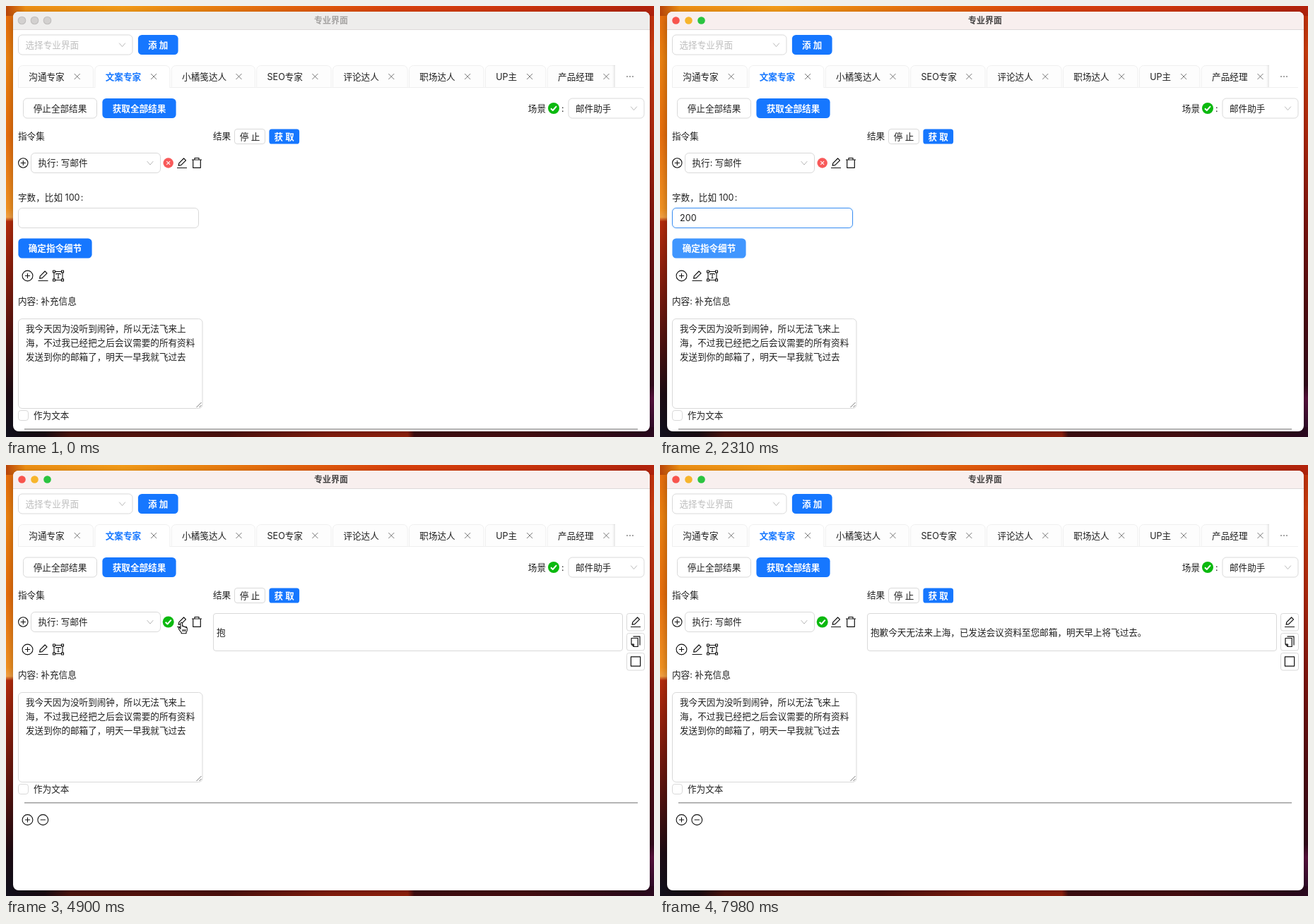
An HTML page with a canvas for the animation above (8000 ms loop, 917x611 px).

```html
<!DOCTYPE html>
<html lang="zh-CN">
<head>
<meta charset="utf-8">
<style>
  html, body { margin: 0; width: 100%; height: 100%; overflow: hidden; background: #fff; }
  canvas { display: block; width: 917px; height: 611px; }
</style>
</head>
<body>
<canvas id="stage"></canvas>
<script>
const W = 917, H = 611, LOOP = 8000, STEP = 70;
const BLUE = '#1677ff', INK = '#1f1f1f', BORDER = '#d9d9d9';
const FONT = 'Inter, "Noto Sans CJK SC", "Noto Sans CJK", sans-serif';
const canvas = document.getElementById('stage');
const ctx = canvas.getContext('2d');
const ratio = window.devicePixelRatio || 1;
canvas.width = W * ratio;
canvas.height = H * ratio;

const ICONS = {
  cross: 'M-4-4L4 4M4-4L-4 4',
  chevron: 'M-4.3-2.4L0 2.6L4.3-2.4',
  tick: 'M-4 .2L-1.2 3L4-2.8',
  plus: 'M-3.6 0H3.6M0-3.6V3.6',
  minus: 'M-3.6 0H3.6',
  pencil: 'M-7 7H7M-4.8 3.6L-4.2 .3L2.6-6.5L5.5-3.6L-1.3 3.1Z',
  trash: 'M-7-4.5H7M-3-4.5V-7H3V-4.5M-5.3-4.5V6.8H5.3V-4.5',
  frame: 'M-6-5.3V5.3M6-5.3V5.3M-5-6H5M-5 6H5M-3-1.4V-3H3V-1.4M0-3V3.2M-1.5 3.2H1.5' +
    'M-7.5-7.5h3v3h-3zM4.5-7.5h3v3h-3zM-7.5 4.5h3v3h-3zM4.5 4.5h3v3h-3z',
  copy: 'M-6-5H3.2V7H-2.6L-6 3.6ZM-6 3.6H-2.6V7M-3.5-7.4H6V5',
  square: 'M-6.6-6.6H6.6V6.6H-6.6Z',
  grip: 'M-7 0L0-7M-3 0L0-3',
  hand: 'M4 10V2.2Q4 .7 5.3 .7T6.6 2.2V6.1Q8.4 5.4 9 6.9Q10.8 6.3 11.3 7.8' +
    'Q13.3 7.5 13.3 9.4V11.6Q13.3 13.4 12 14.5V16.3H5.2V15Q3.6 13.2 1.6 10.2' +
    'Q.6 8.4 1.8 8Q2.8 7.8 4 10ZM6.9 10.4V13.6M8.8 10.4V13.6M10.7 10.4V13.6'
};
for (const name in ICONS) ICONS[name] = new Path2D(ICONS[name]);

const clamp = v => Math.max(0, Math.min(1, v));
const ramp = (t, from, to) => clamp((t - from) / (to - from));

function mix(a, b, p) {
  const channel = (hex, i) => parseInt(hex.slice(i, i + 2), 16);
  return `rgb(${[1, 3, 5].map(i => Math.round(channel(a, i) + (channel(b, i) - channel(a, i)) * p))})`;
}

function text(str, x, y, { color = INK, weight = 400, size = 12.6, align = 'left' } = {}) {
  ctx.font = `${weight} ${size}px ${FONT}`;
  ctx.textAlign = align;
  ctx.fillStyle = color;
  ctx.fillText(str, x, y + size * 0.37);
}

function roundRect(x, y, w, h, radius, fill) {
  ctx.beginPath();
  ctx.roundRect(x, y, w, h, radius);
  ctx.fillStyle = fill;
  ctx.fill();
}

function box(x, y, w, h, { radius = 5.4, fill = '#fff', stroke = BORDER } = {}) {
  roundRect(x + 0.5, y + 0.5, w - 1, h - 1, radius, fill);
  ctx.strokeStyle = stroke;
  ctx.lineWidth = 1;
  ctx.stroke();
}

function line(x1, y1, x2, y2, color, width = 1) {
  ctx.beginPath();
  ctx.moveTo(x1, y1);
  ctx.lineTo(x2, y2);
  ctx.strokeStyle = color;
  ctx.lineWidth = width;
  ctx.stroke();
}

function icon(name, x, y, { color = '#111', width = 1.2, fill } = {}) {
  ctx.save();
  ctx.translate(x, y);
  ctx.lineJoin = 'round';
  if (fill) { ctx.fillStyle = fill; ctx.fill(ICONS[name]); }
  ctx.strokeStyle = color;
  ctx.lineWidth = width;
  ctx.stroke(ICONS[name]);
  ctx.restore();
}

function disc(x, y, r, fill, stroke) {
  ctx.beginPath();
  ctx.arc(x, y, r, 0, 7);
  if (fill) { ctx.fillStyle = fill; ctx.fill(); }
  if (stroke) { ctx.strokeStyle = stroke; ctx.lineWidth = 1.1; ctx.stroke(); }
}

function circled(name, x, y, r = 7.4) {
  disc(x, y, r, null, '#111');
  icon(name, x, y, { width: 1.1 });
}

function badge(x, y, ok) {
  disc(x, y, ok ? 8 : 7.2, ok ? '#0bb90f' : '#f85a5a');
  if (ok) return icon('tick', x, y, { color: '#fff', width: 2 });
  ctx.save();
  ctx.translate(x, y);
  ctx.scale(0.6, 0.6);
  icon('cross', 0, 0, { color: '#fff', width: 1.8 });
  ctx.restore();
}

function button(label, x, y, w, h, { fill = BLUE, radius = 5.4 } = {}) {
  const plain = fill === '#fff';
  if (plain) box(x, y, w, h, { radius });
  else roundRect(x + 0.4, y + 0.4, w - 0.8, h - 0.8, radius, fill);
  text(label, x + w / 2, y + h / 2, { align: 'center', color: plain ? INK : '#fff', weight: plain ? 400 : 600 });
}

function select(label, x, y, w, color = INK) {
  box(x, y, w, 29);
  text(label, x + 10.5, y + 14.5, { color });
  icon('chevron', x + w - 15, y + 14.5, { color: '#b8b8b8', width: 1 });
}

function strip(x, y, w, h, colors) {
  const g = w > h ? ctx.createLinearGradient(0, 0, W, 0) : ctx.createLinearGradient(0, 0, 0, H);
  colors.split(' ').forEach(stop => {
    const [color, at] = stop.split('@');
    g.addColorStop(at / 100, color);
  });
  ctx.fillStyle = g;
  ctx.fillRect(x, y, w, h);
}

function wallpaper() {
  strip(0, 0, 20, H, '#e86a0c@0 #f0840f@12 #ec700c@30 #f79522@47 #f9a545@49 #b82c0c@50 #8e1f0d@62 #50120f@78 #1e0c14@90 #10101c@100');
  strip(897, 0, 20, H, '#c8300c@0 #d8400c@10 #b8290c@30 #84150e@50 #540c12@70 #340b1c@88 #5c1240@91 #260a24@100');
  strip(0, 597, W, 14, '#12101c@0 #1c0c14@6 #56160f@10 #5e150e@20 #54120e@34 #92200e@50 #a0240e@62 #440e12@63 #4e0f12@80 #2c0920@100');
  strip(0, 0, W, 14, '#b84408@0 #f09114@3 #f79d18@18 #ee8510@30 #e6640c@44 #dc420b@60 #d0360b@78 #b3230c@100');
}

function windowFrame() {
  ctx.save();
  ctx.shadowColor = 'rgba(0,0,0,.35)';
  ctx.shadowBlur = 14 * ratio;
  ctx.shadowOffsetY = 4 * ratio;
  roundRect(10, 8, 901, 595, 8, '#fff');
  ctx.restore();
}

function titleBar(active) {
  ctx.fillStyle = active ? '#f8efee' : '#eeedec';
  ctx.fillRect(10, 8, 901, 26);
  line(10, 33.5, 911, 33.5, '#dedada');
  ['#f8544d', '#f7b52c', '#2bc440'].forEach((color, i) =>
    disc(22.5 + i * 18, 20.5, 5.3, active ? color : '#d2d0cf', active ? null : '#c0bebd'));
  text('专业界面', 460, 20.5, { size: 12, weight: 600, align: 'center', color: active ? '#464444' : '#a5a3a2' });
}

function tabs() {
  line(17, 115.5, 903, 115.5, '#f0f0f0');
  ctx.save();
  ctx.beginPath();
  ctx.rect(17, 80, 845, 37);
  ctx.clip();
  const labels = [['沟通专家', 107], ['文案专家', 107], ['小橘笺达人', 119], ['SEO专家', 106.5],
    ['评论达人', 106.5], ['职场达人', 106.5], ['UP主', 86.5], ['产品经理', 107]];
  let x = 17;
  labels.forEach(([label, w], i) => {
    const active = i === 1;
    box(x, 84, w, 32, { radius: [6, 6, 0, 0], fill: active ? '#fff' : '#fdfdfd', stroke: '#efefef' });
    if (active) line(x + 1, 115.5, x + w - 1, 115.5, '#fff', 1.2);
    text(label, x + 15.3, 100, active ? { color: BLUE, weight: 600 } : {});
    icon('cross', x + w - 23.3, 100, { color: '#777', width: 1 });
    x += w + 1.4;
  });
  ctx.restore();
  const shade = ctx.createLinearGradient(858, 0, 862, 0);
  shade.addColorStop(0, 'rgba(0,0,0,0)');
  shade.addColorStop(1, 'rgba(0,0,0,.09)');
  ctx.fillStyle = shade;
  ctx.fillRect(858, 84, 4, 31);
  [-4, 0, 4].forEach(dx => disc(883 + dx, 100, 0.8, '#333'));
}

function fetchButton(t) {
  const wave = ramp(t, 3430, 3920);
  if (t >= 3500 && wave < 1) {
    const spread = 5 * (1 - (1 - wave) ** 3);
    roundRect(372 - spread, 174 - spread, 43.5 + spread * 2, 22 + spread * 2, 3.6 + spread,
      `rgba(22,119,255,${0.35 * (1 - wave)})`);
  }
  const hover = ramp(t, 3150, 3360) - ramp(t, 3570, 3780);
  button('获 取', 372, 174, 43.5, 22, { fill: mix(BLUE, '#4096ff', hover), radius: 3.6 });
}

function details(t) {
  text('字数，比如 100\u200a:', 17, 271.5);
  const focus = ramp(t, 560, 840);
  roundRect(15.5, 284.5, 259, 32, 6.5, `rgba(5,145,255,${0.05 * focus})`);
  box(17, 286, 256, 29, { stroke: mix(BORDER, '#3d8ff2', focus) });
  const digits = [1540, 1680, 1820].filter(at => t >= at).length;
  text('200'.slice(0, digits), 28, 300.3);
  const caretOn = (t >= 630 && t < 1190) || (t >= 1540 && t < 2310);
  if (caretOn) line(28.5 + 7.3 * digits, 293, 28.5 + 7.3 * digits, 307.5, '#111');
  button('确定指令细节', 17, 329, 105, 29, { fill: mix(BLUE, '#4096ff', ramp(t, 2100, 2310)) });
}

function content(t) {
  circled('plus', 30.5, 382.5);
  icon('pencil', 52.5, 382.5);
  icon('frame', 74, 382.5, { width: 1.1 });
  text('内容: 补充信息', 17, 418.5);
  const hover = ramp(t, 2380, 2660) - ramp(t, 2660, 2870);
  box(17, 443, 261.5, 128, { stroke: mix(BORDER, '#4096ff', hover) });
  ['我今天因为没听到闹钟，所以无法飞来上', '海，不过我已经把之后会议需要的所有资料', '发送到你的邮箱了，明天一早我就飞过去']
    .forEach((row, i) => text(row, 28, 457.3 + i * 19.8));
  icon('grip', 276.5, 569, { color: '#666', width: 0.9 });
  box(17, 573, 15, 15, { radius: 3.4 });
  text('作为文本', 39, 580.7);
  line(26, 599.8, 894, 599.8, '#8a8a8a', 1.2);
  circled('plus', 30.5, 624);
  circled('minus', 52.3, 624);
}

function shownChars(t) {
  if (t >= 6230) return 31;
  if (t >= 6160) return 30;
  if (t >= 6090) return 28;
  return Math.floor(1 + 26 * ramp(t, 4900, 5950));
}

function result(t) {
  box(293, 210, 580, 54, { radius: 3.5 });
  text('抱歉今天无法来上海，已发送会议资料至您邮箱，明天早上将飞过去。'.slice(0, shownChars(t)), 298, 237.3);
  ['pencil', 'copy', 'square'].forEach((name, i) => {
    box(878, 210 + i * 28, 26, 25.5, { radius: 3 });
    icon(name, 891, 222.5 + i * 28);
  });
}

function draw(t) {
  const confirmed = t >= 2450;
  ctx.setTransform(ratio, 0, 0, ratio, 0, 0);
  wallpaper();
  windowFrame();
  ctx.save();
  ctx.beginPath();
  ctx.roundRect(10, 8, 901, 595, 8);
  ctx.clip();

  titleBar(t >= 630);
  select('选择专业界面', 17, 40.5, 162.5, '#bfbfbf');
  button('添 加', 186.5, 40.5, 57.5, 29);
  tabs();
  button('停止全部结果', 24, 130.5, 105, 29, { fill: '#fff' });
  button('获取全部结果', 136, 130.5, 105, 29);
  text('场景', 738.8, 145.2);
  badge(775, 145, true);
  text(':', 786, 145.2);
  select('邮件助手', 795.5, 130.5, 108);

  text('指令集', 17, 184.3);
  text('结果', 293, 184.8);
  button('停 止', 323, 174, 44, 22, { fill: '#fff', radius: 3.6 });
  fetchButton(t);
  circled('plus', 24.3, 222.5, 6.7);
  select('执行: 写邮件', 35, 208, 184);
  badge(229.7, 222.5, confirmed);
  icon('pencil', 249, 222.5);
  icon('trash', 270, 222.5);

  if (!confirmed) details(t);
  ctx.save();
  if (confirmed) ctx.translate(0, -121);
  content(t);
  ctx.restore();
  if (t >= 4900) result(t);
  if (t >= 4760 && t < 7840) icon('hand', 243, t < 5740 ? 222.5 : 223.5, { fill: '#fff', width: 1.1 });
  ctx.restore();
}

const start = performance.now();
function tick() {
  const t = (performance.now() - start) % LOOP;
  draw(Math.floor(t / STEP) * STEP);
  requestAnimationFrame(tick);
}
tick();
</script>
</body>
</html>
```
